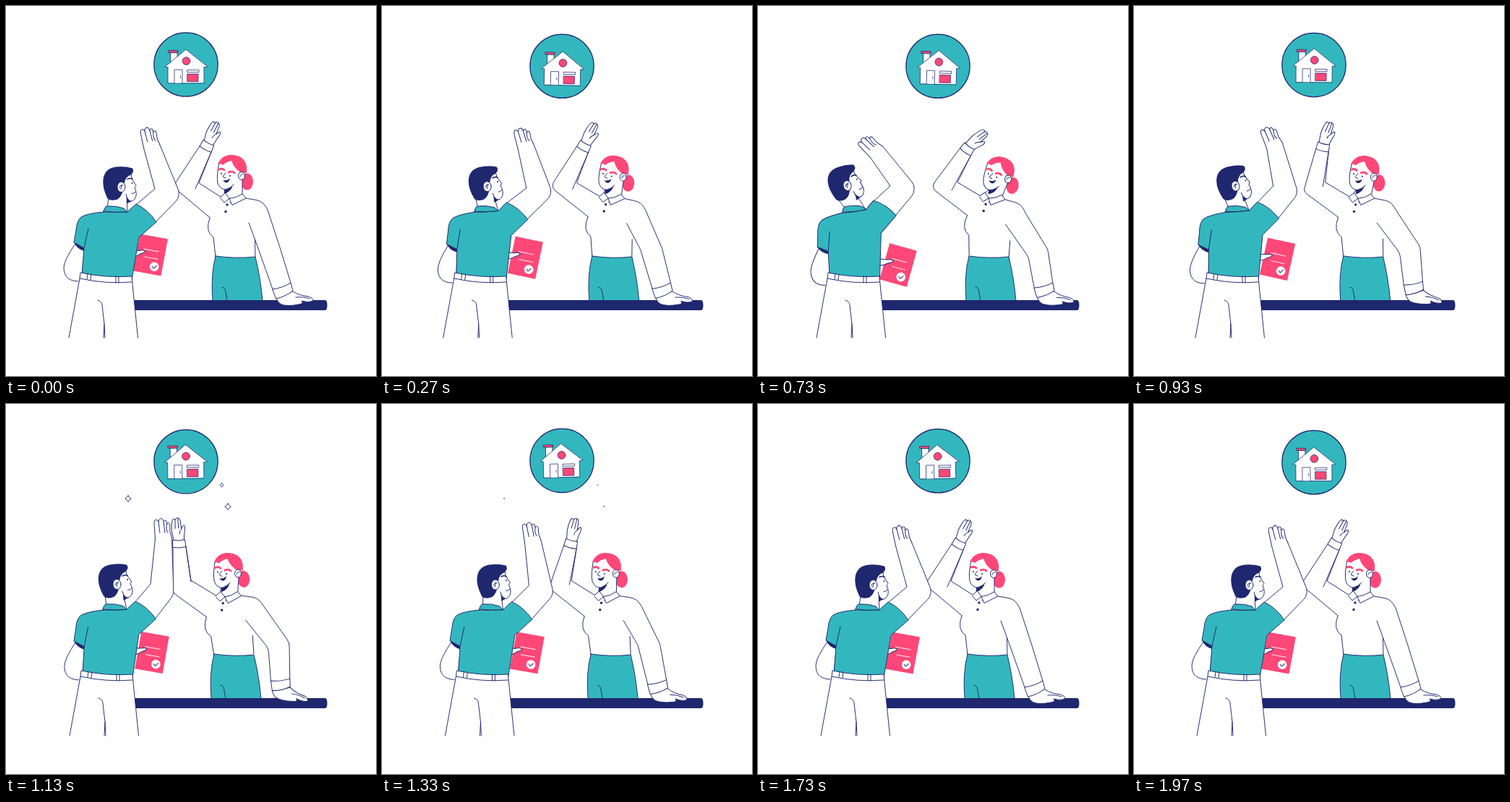
Animation, 512 px wide and 512 px high, one loop 2 s. Source, as an HTML page with a canvas:

```html
<!DOCTYPE html>
<html lang="en">
<head>
<meta charset="utf-8">
<title>High five</title>
<style>
html, body { margin: 0; width: 100%; height: 100%; overflow: hidden; background: #fff; }
canvas { display: block; width: 100vmin; height: 100vmin; }
</style>
</head>
<body>
<canvas id="stage" width="512" height="512"></canvas>
<script>
const ctx = document.getElementById('stage').getContext('2d');
const LOOP = 2000;
const NAVY = '#1f276f', TEAL = '#33b7be', PINK = '#ff4778', WHITE = '#fff';

function ease(t, from, to) {
  const u = Math.min(1, Math.max(0, (t - from) / (to - from)));
  return u * u * (3 - 2 * u);
}

// Wind up, swing to the clap, recover. Parts further from the hips start later (lag).
function motion(t) {
  const swing = ease(t, 730, 1100);
  const clapped = swing * (1 - ease(t, 1130, 1500));
  return (lag, rest, wind, clap) => {
    const wound = ease(t, lag, 640) * (1 - swing);
    return rest.map((r, k) => r + (wind[k] - r) * wound + (clap[k] - r) * clapped);
  };
}

const place = (x, y, angle = 0, px = 0, py = 0) =>
  new DOMMatrix().translate(x, y).rotate(angle).translate(-px, -py);

const point = (m, x, y) => {
  const p = m.transformPoint({ x, y });
  return [p.x, p.y];
};

const use = m => ctx.setTransform(m);

function draw(d, fill, line = NAVY, width = .95) {
  const path = typeof d === 'string' ? new Path2D(d) : d;
  if (fill) { ctx.fillStyle = fill; ctx.fill(path); }
  if (line) { ctx.strokeStyle = line; ctx.lineWidth = width; ctx.stroke(path); }
}

function oval(x, y, rx, ry, fill, line, width) {
  const path = new Path2D();
  path.ellipse(x, y, rx, ry, 0, 0, 7);
  draw(path, fill, line, width);
}

// A third value on a point is the radius of a rounded corner
function trace(points) {
  const path = new Path2D();
  path.moveTo(...points[0]);
  points.slice(1).forEach(([x, y, r], i) => {
    if (r) path.arcTo(x, y, ...points[i + 2].slice(0, 2), r);
    else path.lineTo(x, y);
  });
  return path;
}

// Two outlined sides with open ends
function limb(outer, inner) {
  use(place(0, 0));
  draw(trace([...outer, ...inner]), WHITE, null);
  draw(trace(outer), null);
  draw(trace(inner), null);
}

// Neck sides run from the head to the collar
function neck(left, right) {
  use(place(0, 0));
  draw(trace([...left, ...right]), WHITE, null);
  draw(trace(left), null);
  draw(trace(right), null);
}

function drawBadge(t) {
  const w = 2 * Math.PI * t / LOOP;
  const thin = (d, fill) => draw(d, fill, NAVY, .75);
  use(place(249, 81 + 3 * Math.sin(w)));
  oval(0, 0, 44.2, 44.2, TEAL, NAVY, 1.2);
  use(place(249 + Math.sin(w), 80.5 + 4.4 * Math.sin(w + .25), 1.7 * Math.sin(w)));
  thin('M-21 -17H-12V-4H-21Z', WHITE);
  thin('M-24 -20H-11V-17H-24Z', PINK);
  thin('M-25 25V3L0 -18L25 3V25Z', WHITE);
  draw('M-29 2.5L0 -21.5L30 2.5L25 3H-25Z', WHITE, null);
  thin('M-25 3L-29 2.5L0 -21.5L30 2.5L25 3');
  oval(.5, -5.5, 5.4, 5.4, PINK, NAVY, .75);
  thin('M-16 25V6.5H-5V25', WHITE);
  thin('M-7.5 15V18');
  thin('M2 7H18V10H2Z', WHITE);
  thin('M2 12.5H17V23H2Z', PINK);
}

function drawWoman(pose) {
  const [dx, angle] = pose(0, [0, 0], [2, 5.6], [-2, -3]);
  const body = place(317 + dx, 347, angle, 317, 347);
  const head = place(...pose(0, [326, 235, 0], [346, 239.5, 9], [321, 234.5, -2]), 326, 235);
  const rest = place(...pose(0, [382, 388, 0], [395.5, 387, 4], [380, 382, 13]), 382, 388);
  const [hx, hy, turn, bend] = pose(160, [276, 198, 28, -2], [287, 202, 35, 18], [240, 198, -3, 0]);
  const cuff = place(hx, hy, turn);

  // Hair bun and neck
  use(head);
  oval(333.5, 243, 8.5, 11.5, PINK, null);
  neck([point(head, 303, 252), point(body, 302, 262)],
    [point(body, 310, 272), point(body, 327, 264), point(head, 327, 238)]);
  use(head);
  draw('M302 253Q310 252 314 247Q312 257 302 260Z', NAVY, null);

  // Blouse
  use(body);
  draw('M297 264L282 293Q276 310 287 320L290 352H345V323L362 284Q352 271 330 266L313 275L303 270Z', WHITE, null);
  draw('M282 293Q275 312 287 320L290 347M345 347L344.5 322', null);
  draw('M303 259L296 265L302 272L309 266.5Z', WHITE);
  draw('M309 266.5L313 275.5L332 266L327 260Q318 266 309 266.5Z', WHITE);
  oval(306, 275, 1.7, 1.7, NAVY, null);
  oval(304, 284.5, 1.7, 1.7, NAVY, null);

  // Skirt and table
  use(place(dx, 0));
  draw('M290 346Q318 350 345 347Q352 375 355 408H286Q283 372 290 346Z', TEAL);
  draw('M299 389Q304 390 304 397L306 407', null);
  use(place(0, 0));
  draw('M165 407H442Q444.5 408 444.5 414Q444.5 420 442 421H165Z', NAVY, null);

  // Arm on the table
  const [ox, oy, ix, iy] = pose(0, [379, 334, 347, 330], [401, 337, 374, 347], [392, 330, 363, 338]);
  limb([point(body, 332, 266), [...point(body, 355, 270), 20], point(body, 362, 282), [ox, oy, 18],
    point(rest, 394, 383)], [point(rest, 369, 392), [ix, iy, 18], point(body, 336, 300)]);
  use(rest);
  draw('M397 395Q406 401 419 402Q425 404 425 408Q418 411 409 408Q413 412 405 413Q390 416 381 413Q376 410 374 405Z', WHITE);
  draw('M401 403Q412 402 420 405', null);
  draw('M369 392Q383 390 394 383L397 394Q387 402 374 405Z', WHITE);

  // Raised arm
  const [ex, ey, cx, cy] = pose(80, [231, 250, 267, 245], [239, 251, 276, 244], [231, 261, 256, 244]);
  const [bx, by] = pose(80, [262, 253], [268, 255], [256, 246]);
  const wrist = point(cuff, 9, 0);
  limb([point(body, 297, 264), [cx, cy], wrist],
    [point(cuff, -9, 0), [ex, ey, 9], point(body, 282.5, 293)]);
  draw(trace([wrist, [bx, by]]), null);
  use(cuff.multiply(place(0, -8, bend, 0, -8)));
  draw('M-7 -8L-9.5 -22Q-9.5 -37 -7 -39Q-5 -40 -4 -38Q-2 -42 0 -40Q1.5 -41 3 -37L4 -25Q6 -30 8 -30Q10 -28 8 -20L6.5 -8Z', WHITE);
  draw('M-4 -38L-4.5 -26M0 -40V-26M4 -25Q1 -22 1 -18', null);
  use(cuff);
  draw('M-9 0Q0 2 9 0L8 -10Q0 -8 -8.5 -10Z', WHITE);

  // Face and hair
  use(head);
  draw('M296 216Q291 235 293 245Q296 254 304 254Q311 252 316 246L327 240V225L312 211Z', WHITE, null);
  draw('M295 217Q291 235 293 245Q296 254 304 254Q311 252 315 247', null);
  draw('M293 219Q298 207 310 206Q330 206 333 222V231H326Q316 226 312 214Q304 216 300 220Q296 217 293 219Z', PINK, null);
  oval(326, 235, 4.5, 5.5, WHITE);
  draw('M324 236Q325 232 328 233', null);
  draw('M295 226Q299 224 302 227M308 230Q313 228 316 231', null, PINK, 2.8);
  oval(298, 232, 1, 1, NAVY, null);
  oval(310, 235, 1, 1, NAVY, null);
  draw('M304 231Q299 236 301 237L304 238', null);
  draw('M300 241Q306 242 310 238.5Q308 246 303 244Z', NAVY, null);
}

function drawMan(pose) {
  const [dx, angle] = pose(0, [0, 0], [-6, -8], [1, -1.3]);
  const body = place(138 + dx, 372, angle, 138, 372);
  const head = place(...pose(0, [160, 250.5, 0], [124, 248.5, -14], [154, 249.5, -4]), 160, 250);
  const hand = place(...pose(200, [202, 195, -9], [164, 202, -41], [218, 186, -1]));

  // Document and the hand holding it
  use(place(...pose(80, [200, 344.5, 10.5], [194, 358.5, 15.5], [202, 344, 10])));
  draw('M-19.5 -26H19.5V26H-19.5Z', PINK, null);
  draw('M-11 -6.5H10M-8 4H11', null, '#ffd5df', 1.2);
  oval(8, 15, 6.3, 6.3, WHITE, null);
  draw('M5 15L7.5 17.5L11 13', null);
  draw('M-30 -1L-17 -3Q-10 -6 -8 -3.5Q-9 -1 -14 1Q-20 7 -28 8Z', WHITE);

  // Lowered arm
  use(body);
  draw('M96 329Q80 352 80 362Q80 382 104 381L109 335Z', WHITE);
  draw('M94 327L109 334L108 339Q98 336 94 327Z', NAVY, null);

  // Raised arm
  const [ex, ey, cx, cy] = pose(80, [242, 263, 206, 253], [221, 253, 183, 249], [232, 264, 200, 249]);
  limb([point(body, 180, 275), [cx, cy], point(hand, -11.5, 0)],
    [point(hand, 11.5, 0), [ex, ey, 16], point(body, 207, 299)]);
  use(hand);
  draw('M-11.5 0L-12.5 -19Q-13 -26 -10 -26Q-7 -26 -6.5 -23Q-6 -28 -2.5 -27.5Q0 -27 .5 -23Q2 -26 4 -24.5Q5 -23 5 -20Q8 -23 9 -19V-10L11.5 0', WHITE);
  draw('M-6.5 -23L-5 -8M.5 -23L2 -8M5 -20Q3 -12 6 -8', null);

  neck([point(head, 142, 264), point(body, 140, 280)],
    [point(body, 168, 286), point(head, 167, 260)]);
  use(head);
  draw('M167 261Q170 268 175 269L167 273Z', NAVY, null);

  // Shirt
  use(body);
  draw('M135 285Q112 287 104 292Q98 297 97 310L94 327L108 335L104 385H173L184 320L208 299Q197 282 180 274Q172 281 168 285Q150 286 135 285Z', TEAL);
  draw('M114 308L108 335', null);
  draw('M135 284Q136 279 139 277Q152 276 163 280L168 285Q150 286 135 284Z', TEAL);

  // Trousers and belt
  use(place(dx, 0));
  draw('M103 369Q138 376.5 174 374L176 395L182.5 459H87L101 377Z', WHITE, null);
  draw('M87 459L102 377L103 369Q138 376.5 174 374L176 395L182.5 459', null);
  draw('M102 377Q138 385 174 382M113 370L112 378M118 371L117 379M152 374V383M156 374V383', null);
  draw('M127 407Q133 409 133 414L136 440L137 459M136 440L135 459', null);

  // Head
  use(head);
  draw('M158 230H171L174 238Q177 243 180 248L178 250Q182 260 179 265Q176 271 171 269Q167 266 166 260L155 258Z', WHITE, null);
  draw('M173 232L174 238Q177 243 180 248L178 250Q182 260 179 265Q176 271 171 269Q167 266 166 260', null);
  draw('M175 224Q178 229 173 233Q165 236 164 244L160 250L161 258Q157 268 150 268Q143 269 140 265Q133 250 134.5 239Q137 223 154 222Q165 221 175 224Z', NAVY, null);
  oval(159.5, 250, 5.5, 7, WHITE);
  draw('M157 251Q158 246 162 248M160 247L159 253', null);
  draw('M168 239Q172 237 175 239', null, NAVY, 1.6);
  oval(174.5, 244.5, 1, 1, NAVY, null);
  draw('M174 259Q177 259 179 257', null);
}

function drawSparkles(t) {
  const u = (t - 1040) / 300;
  if (u <= 0 || u >= 1) return;
  const sparkle = (x, y, r) => {
    const s = r * 1.25 * Math.sin(Math.PI * u), q = s * .4;
    use(place(x, y));
    draw(`M0 ${-s}Q${q} ${-q} ${s} 0Q${q} ${q} 0 ${s}Q${-q} ${q} ${-s} 0Q${-q} ${-q} 0 ${-s}Z`, WHITE);
  };
  sparkle(169, 131, 4);
  sparkle(307, 142, 4);
  sparkle(298.5, 112.5, 2.6);
}

ctx.lineJoin = ctx.lineCap = 'round';

function frame() {
  const t = performance.now() % LOOP;
  const pose = motion(t);
  ctx.resetTransform();
  ctx.fillStyle = WHITE;
  ctx.fillRect(0, 0, 512, 512);
  drawBadge(t);
  drawWoman(pose);
  drawMan(pose);
  drawSparkles(t);
  requestAnimationFrame(frame);
}
frame();
</script>
</body>
</html>
```
